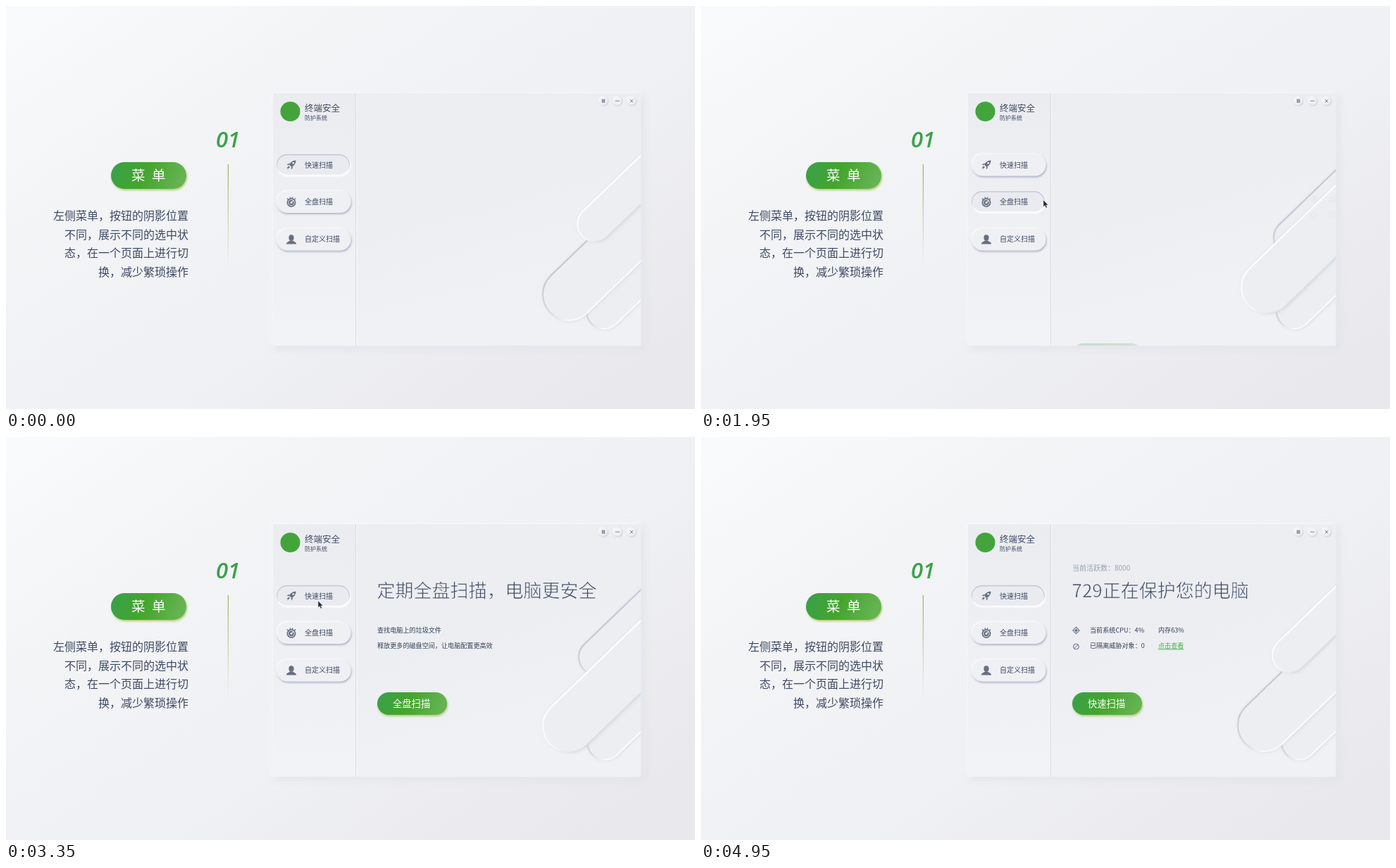
An HTML page that plays this animation: 978 px wide and 573 px high, repeating every 5920 ms.

```html
<!DOCTYPE html>
<html lang="zh-CN">
<head>
<meta charset="utf-8">
<title>菜单</title>
<style>
html, body { margin: 0; width: 100%; height: 100%; overflow: hidden; background: #f1f2f5; }
svg { display: block; width: 978px; height: 573px; font-family: "Noto Sans CJK SC", "Noto Sans CJK", sans-serif; }
.window { filter: drop-shadow(-2px -2px 4px rgba(255,255,255,.6)) drop-shadow(4px 4px 4px #dfe1ea); }
.raised { filter: drop-shadow(-1px -1px 1px #fff) drop-shadow(1px 2px 1px rgba(158,164,186,.75)); }
.inset { filter: drop-shadow(1px 1px 1px #fff); }
.soft { filter: drop-shadow(1px 1px 2px rgba(190,195,210,.5)); }
.knob { filter: drop-shadow(-1px -1px 1px #fff) drop-shadow(1px 1px 1px rgba(170,176,195,.55)); }
.green { filter: drop-shadow(1.5px 2px 1.5px rgba(160,190,70,.75)); }
.icon { fill: #667081; }
.line { fill: none; stroke: #59667d; }
.thin { stroke: #edeff3; stroke-width: .7; }
</style>
</head>
<body>
<svg viewBox="0 0 978 573" xmlns="http://www.w3.org/2000/svg">
  <defs>
    <linearGradient id="back" gradientUnits="userSpaceOnUse" x1="120" y1="-60" x2="640" y2="700">
      <stop offset="0" stop-color="#f9fafc"/><stop offset=".3" stop-color="#f3f4f6"/>
      <stop offset=".65" stop-color="#eff0f3"/><stop offset="1" stop-color="#e9e8ec"/>
    </linearGradient>
    <linearGradient id="panel" x1="0" y1="0" x2=".4" y2="1">
      <stop offset="0" stop-color="#ecedf1"/><stop offset=".5" stop-color="#eceef2"/><stop offset="1" stop-color="#f0f1f5"/>
    </linearGradient>
    <linearGradient id="side" x1="0" y1="0" x2="0" y2="1">
      <stop offset="0" stop-color="#ebecf0"/><stop offset="1" stop-color="#f2f3f7"/>
    </linearGradient>
    <linearGradient id="leaf" x1="0" y1="0" x2="1" y2=".15">
      <stop offset="0" stop-color="#38a04c"/><stop offset=".5" stop-color="#44a52d"/><stop offset="1" stop-color="#65b352"/>
    </linearGradient>
    <linearGradient id="dark" x1="0" y1="0" x2="0" y2="1">
      <stop offset="0" stop-color="#c3c7d2"/><stop offset=".5" stop-color="#d0d3db"/><stop offset=".85" stop-color="#fbfbfd"/>
    </linearGradient>
    <linearGradient id="light" x1="0" y1="0" x2="0" y2="1">
      <stop offset="0" stop-color="#fff"/><stop offset=".6" stop-color="#f8f9fb"/><stop offset="1" stop-color="#dadde4"/>
    </linearGradient>
    <linearGradient id="rule" x1="0" y1="0" x2="0" y2="1">
      <stop offset="0" stop-color="#8d9a4c"/><stop offset=".5" stop-color="#c4c39a"/><stop offset="1" stop-color="#c4c39a" stop-opacity="0"/>
    </linearGradient>
    <clipPath id="view"><rect x="498" y="124" width="403" height="359"/></clipPath>
  </defs>
  <rect width="978" height="573" fill="url(#back)"/>
  <g id="intro"></g>
  <rect class="window" x="379" y="124" width="522" height="359" fill="url(#panel)"/>
  <rect x="379" y="124" width="117" height="359" fill="url(#side)"/>
  <path d="M496.5 124v359" stroke="#d5d8df"/><path d="M497.5 124v359" stroke="#f8f9fb"/>
  <g clip-path="url(#view)"><g id="decor"></g><g id="pages"></g></g>
  <g id="frame"></g>
  <path id="cursor" d="M0 0V9.4L2.2 7.5 3.8 11 5.4 10.3 3.9 6.9H6.8Z" fill="#1f2a3a" stroke="#f4f5f8" stroke-width=".4"/>
</svg>
<script>
const LOOP = 5920, STEP = 70;
const RUNS = [[140, 1610], [1810, 3350], [3550, 4950]];
const INK = '#3d4963';
const $ = id => document.getElementById(id);
const clamp = v => Math.min(1, Math.max(0, v));

// Text placed by the vertical centre of its glyphs
const text = (s, x, y, size, fill = INK, more = '') =>
  `<text x="${x}" y="${y + size * .38}" font-size="${size}" fill="${fill}" ${more}>${s}</text>`;
const pill = (x, y, w, h, more) =>
  `<rect x="${x}" y="${y}" width="${w}" height="${h}" rx="${h / 2}" ${more}/>`;
const button = (x, y, w, h) => pill(x, y, w, h, 'fill="url(#leaf)" class="green"');

function intro() {
  const lines = ['左侧菜单，按钮的阴影位置', '不同，展示不同的选中状', '态，在一个页面上进行切', '换，减少繁琐操作'];
  return button(149, 222, 107, 38) + text('菜', 178, 241, 19.5, '#fff') + text('单', 207, 241, 19.5, '#fff') +
    '<text x="298" y="201" font-family="Open Sans, Noto Sans, sans-serif" font-style="italic" font-weight="600" font-size="31" fill="#3aa24a">01</text>' +
    '<rect x="314.8" y="225" width="1" height="145" fill="url(#rule)"/>' +
    lines.map((s, i) => text(s, 259, 298 + i * 26.7, 16, INK, 'text-anchor="end"')).join('');
}

const ICONS = [
  '<path d="M6.5-6.5C2-6.5-1.5-3.5-3-.5L.5 3C3.5 1.5 6.5-2 6.5-6.5ZM-2.5-2.5-6.5-.5-3.5.5ZM2.5 2.5.5 6.5-.5 3.5ZM-3.5 1.5-6.5 4-5 4.2-5.8 6.5-2 3Z"/><circle cx="2.7" cy="-2.7" r="1.4" fill="#eceef2"/>',
  '<circle cy="1" r="6.5"/><path d="M-6-5l2 2M-2-7l.8 2M2-7l-.8 2M6-5l-2 2" stroke="#667081" stroke-width="1.3"/><circle cy="1" r="4.3" fill="none" stroke="#eceef2"/><path d="M0 1 3.5-2.5" stroke="#eceef2" stroke-width="1.2"/><circle cy="1" r="1.5" fill="#eceef2"/>',
  '<ellipse cy="-2.5" rx="3.6" ry="4.2"/><path d="M-7.2 6.5C-7 3.5-3.5 3-2 1.5H2C3.5 3 7 3.5 7.2 6.5Z"/>'
];

function menuItem(label, i) {
  const y = [226, 278.5, 332][i];
  return `<g id="up${i}">${pill(384.5, y - 15.5, 105, 31, 'fill="#eff0f4" class="raised"')}</g>` +
    `<g id="down${i}">${pill(384.5, y - 14.5, 103, 29, 'fill="#e9ebf0" stroke="url(#dark)" stroke-width="1.4" class="inset"')}</g>` +
    `<g class="icon" transform="translate(405 ${y})">${ICONS[i]}</g>` + text(label, 424, y - (i ? .7 : 0), 10);
}

function frame() {
  const signs = ['M-2.5-2h5M-2.5 0h5M-2.5 2h5M-1.2-2v4M1.2-2v4', 'M-3.2 0h6.4', 'M-2.3-2.3 2.3 2.3M2.3-2.3-2.3 2.3'];
  return '<circle cx="403.5" cy="150" r="14" fill="#43a43c"/>' +
    text('终端安全', 424, 145, 12.5) + text('防护系统', 424, 159, 8) +
    ['快速扫描', '全盘扫描', '自定义扫描'].map(menuItem).join('') +
    signs.map((d, i) => `<g transform="translate(${848 + i * 20} 135)"><circle r="5.6" fill="#f1f2f6" class="knob"/><path d="${d}" class="line" stroke-width=".8"/></g>`).join('');
}

// Capsules leaning up to the right: end centre and radius
const capsule = (name, x, y, r, look) =>
  `<g data-cap="${name}"><rect class="soft" transform="translate(${x} ${y}) rotate(-44)" x="${-r}" y="${-r}" width="340" height="${2 * r}" rx="${r}" fill="#edeef2" stroke="url(#${look})" stroke-width="1.8"/></g>`;
const decor = () =>
  `<g id="decor0">${capsule('low', 849, 434, 25, 'dark')}${capsule('main', 799, 410, 37, 'dark')}${capsule('top', 836, 310, 25, 'light')}</g>` +
  `<g id="decor1">${capsule('low', 850, 434, 25, 'dark')}${capsule('top', 838, 313, 25, 'dark')}${capsule('main', 799, 411, 37, 'light')}</g>`;

function page(n, head, list, label) {
  return `<g id="head${n}">${head}</g><g id="list${n}">${list}</g>` +
    `<g id="go${n}">${button(527, 363, 99, 32)}${text(label, 549, 379, 13.3, '#fff')}</g>`;
}
const title = s => text(s, 526.5, 218, 26, '#3d4963', 'class="thin"');
function pages() {
  const row = (s, x, y, fill = '#333f57', more) => text(s, x, y, 9.1, fill, more);
  const icons = '<g class="line"><circle cx="532.5" cy="275" r="3.7"/><path d="M532.5 269.5v2M532.5 278.5v2M527 275h2M536 275h2"/><circle cx="532.5" cy="275" r="1.5" fill="#59667d"/><circle cx="532.5" cy="298" r="3.9"/><path d="M529.8 300.7l5.4-5.4"/></g>';
  return page(0, text('当前活跃数：8000', 527, 186, 10, '#98a1b0') + title('729正在保护您的电脑'),
      icons + row('当前系统CPU：4%', 552, 275) + row('内存63%', 649, 275) +
      row('已隔离威胁对象：0', 552, 297) + row('点击查看', 649, 297, '#45b045', 'text-decoration="underline"'),
      '快速扫描') +
    page(1, title('定期全盘扫描，电脑更安全'),
      row('查找电脑上的垃圾文件', 527, 275) + row('释放更多的磁盘空间，让电脑配置更高效', 527, 297),
      '全盘扫描');
}

$('intro').innerHTML = intro();
$('decor').innerHTML = decor();
$('pages').innerHTML = pages();
$('frame').innerHTML = frame();

// Travel of each part, its first entry and its later entries (start, end)
const PARTS = {
  head: { dx: 0, dy: -120, first: [70, 880], next: [438, 1031] },
  list: { dx: 354, dy: 0, first: [70, 880], next: [352, 1056] },
  go: { dx: 0, dy: 122, first: [70, 700], next: [256, 1134] }
};
const DRIFT = { low: [-8, 0], main: [5, -11], top: [0, 16] };
const CURSOR = [
  [770, 860, 130], [980, 759, 203], [1330, 543, 266], [1470, 482, 279], [1610, 456, 281],
  [1740, 456, 281], [1810, 463, 280], [1950, 486, 276], [2370, 572, 262], [2440, 576, 261],
  [2650, 564, 261], [3000, 505, 243], [3140, 470, 236], [3350, 443, 233], [3480, 443, 233],
  [4110, 640, 252], [4740, 821, 143], [4810, 847, 128]
];

function snap(t) {
  let q = 0;
  for (const [a, b] of RUNS) if (t >= a) q = Math.min(b, a + Math.floor((t - a) / STEP) * STEP);
  return q;
}
const enter = (q, [s, e]) => clamp((e - q) / (e - s)) ** 3;
const leave = (q, s) => clamp((q - s) / 215) ** 2;

function away(n, part, q) {
  if (n) return q < 3480 ? enter(q - 1810, part.next) : leave(q, 3480);
  if (q < 1740) return enter(q, part.first);
  return q < 3000 ? leave(q, 1740) : enter(q - 3550, part.next);
}
// 0 on the first page, 1 on the second, with short crossfades
const mix = (q, on, off) => clamp((q - on) / 140) - clamp((q - off) / 140);

function moveCursor(q) {
  const i = CURSOR.findIndex(k => k[0] >= q);
  const shown = q >= CURSOR[0][0] && i >= 0;
  $('cursor').setAttribute('visibility', shown ? 'visible' : 'hidden');
  if (!shown) return;
  const b = CURSOR[i], a = CURSOR[Math.max(0, i - 1)];
  const u = b === a ? 1 : (q - a[0]) / (b[0] - a[0]);
  $('cursor').setAttribute('transform', `translate(${a[1] + (b[1] - a[1]) * u} ${a[2] + (b[2] - a[2]) * u})`);
}

function draw(t) {
  const q = snap(t);
  for (const n of [0, 1]) for (const name in PARTS) {
    const part = PARTS[name], f = away(n, part, q), el = $(name + n);
    el.setAttribute('transform', `translate(${part.dx * f} ${part.dy * f})`);
    el.setAttribute('opacity', name === 'go' ? Math.sqrt(1 - f) : 1 - f);
  }

  const second = mix(q, 1740, 3480);
  $('decor0').setAttribute('opacity', 1 - second);
  $('decor1').setAttribute('opacity', second);
  const since = q >= 3550 ? q - 3550 : q >= 1810 ? q - 1810 : 560;
  const drift = Math.min(1.4, (Math.max(0, 560 - since) / 420) ** 3);
  for (const el of document.querySelectorAll('[data-cap]')) {
    const [dx, dy] = DRIFT[el.dataset.cap];
    el.setAttribute('transform', `translate(${dx * drift} ${dy * drift})`);
  }

  const picked = mix(q, 1440, 3180);
  [1 - picked, picked, 0].forEach((v, i) => {
    $('down' + i).setAttribute('opacity', v);
    $('up' + i).setAttribute('opacity', 1 - v);
  });
  moveCursor(q);
}

function tick() {
  draw(performance.now() % LOOP);
  requestAnimationFrame(tick);
}
tick();
</script>
</body>
</html>
```
